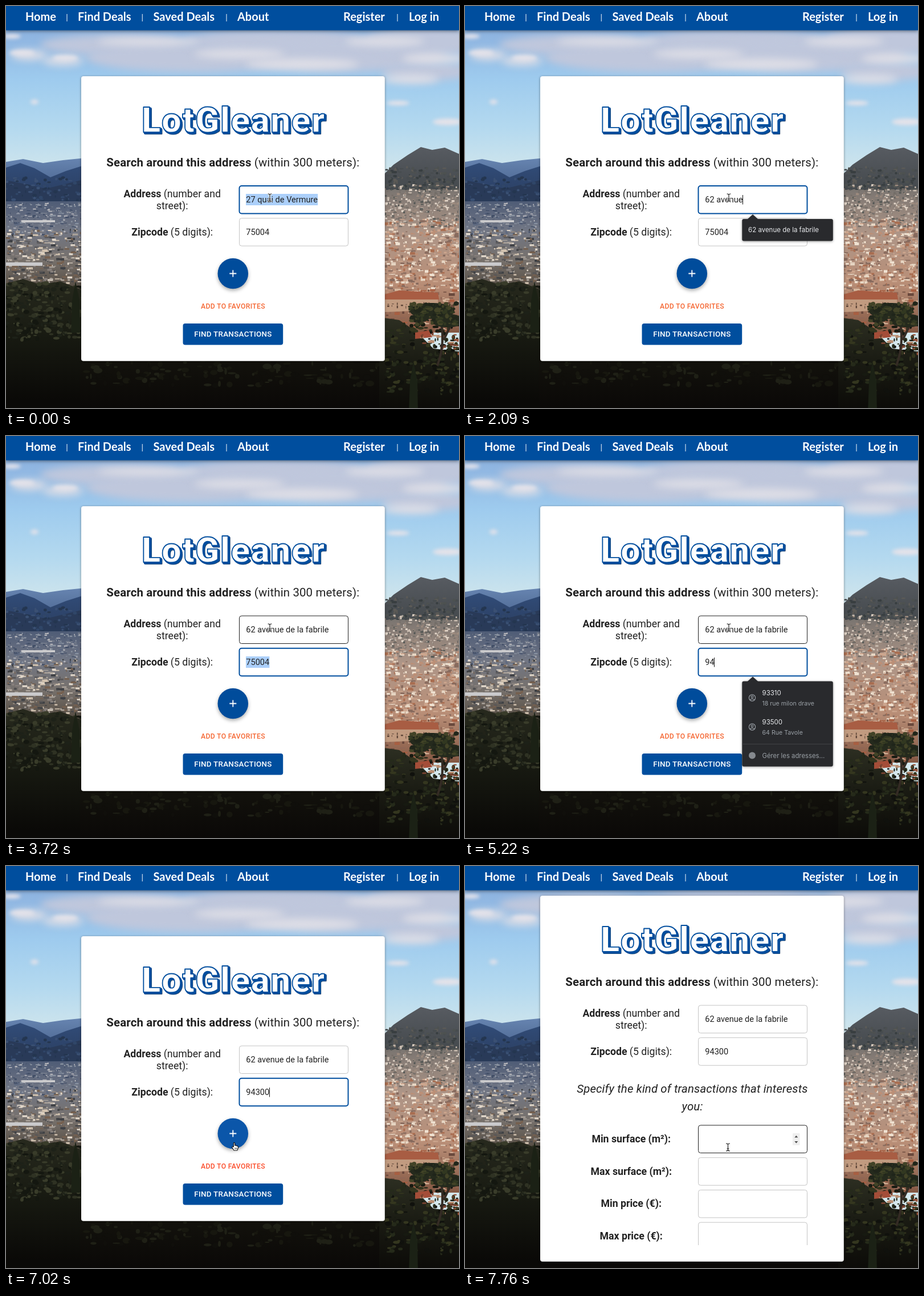
Recreate the animation shown at these times as an HTML page with a canvas. Size 795x704 px, loop 8 s.

```html
<!DOCTYPE html>
<html lang="en">
<head>
<meta charset="utf-8">
<title>LotGleaner</title>
<style>
  html, body { margin: 0; width: 100%; height: 100%; overflow: hidden; background: #0b0908; }
  canvas, svg { position: absolute; left: 0; top: 0; width: 795px; height: 704px; }
  text { font-family: Roboto, sans-serif; fill: #212121; white-space: pre; }
  .mid { text-anchor: middle; }
  .b { font-weight: 700; }
  .nav text { font: 700 20px Lato, sans-serif; fill: #fff; }
  .nav .sep { font-size: 14px; font-weight: 400; }
  .brand { font-size: 62px; font-weight: 900; letter-spacing: 1.5px; stroke-linejoin: round; }
  .head { font-size: 20.4px; letter-spacing: .15px; }
  .label { font-size: 17.7px; }
  .value { font-size: 14.55px; }
  .box { fill: #fff; stroke: #c4c4c4; stroke-width: 1; }
  .box.hover { stroke: #212121; }
  .box.focus { stroke: #004e9e; stroke-width: 2; }
  .sel { fill: #abcffa; }
  .caret { fill: #111; }
  .caps { font-weight: 500; }
  #fav { font-size: 12.2px; letter-spacing: .35px; fill: #f56733; }
  #fav.hover { fill: #fb4d2b; }
  #fab { fill: #004c9b; filter: drop-shadow(0 3px 3px #0005); }
  #fab.hover { fill: #0b56a9; }
  .menu { filter: drop-shadow(0 1px 2px #0006); }
  .menu text { font: 11.5px Inter, sans-serif; fill: #e8eaed; }
  .menu .dim { fill: #9aa0a6; font-size: 10.6px; }
  .menu .foot { fill: #9aa0a6; font-size: 11.3px; }
</style>
</head>
<body>
<canvas id="view" width="795" height="704"></canvas>
<svg viewBox="0 0 795 704">
  <defs>
    <clipPath id="fold"><rect x="132" y="360" width="533" height="304"/></clipPath>
    <g id="ibeam" fill="none" stroke-linecap="round">
      <path id="beam" d="M-3-6.5Q0-6.5 0-4.5Q0-6.5 3-6.5M0-4.5V4.5M-3 6.5Q0 6.5 0 4.5Q0 6.5 3 6.5M-1.5 2.5H1.5" stroke="#fff" stroke-width="2.6"/>
      <use href="#beam" style="stroke:#111"/>
      <path d="M-3-6.5Q0-6.5 0-4.5Q0-6.5 3-6.5M0-4.5V4.5M-3 6.5Q0 6.5 0 4.5Q0 6.5 3 6.5M-1.5 2.5H1.5" stroke="#111" stroke-width="1.1"/>
    </g>
    <path id="arrow" d="M-4-7V6L-1 3.3L1 8L3.2 7L1.2 2.5H5Z" fill="#111" stroke="#fff"/>
    <g id="hand" stroke="#111" stroke-linejoin="round">
      <path d="M-2.6 1V-5.6Q-1.5-7.6-.4-5.6V-1.5Q1-2.6 1.7-1Q3.2-1.9 3.8-.3Q5.4-.8 5.4 1V3.4L3.8 7H-2L-5.4 1.6Q-5-.6-2.6 1Z" fill="#fff" stroke-width="1.1"/>
      <path d="M-.2 2.3V5M1.6 2.3V5M3.3 2.3V5" stroke-width=".7"/>
    </g>
  </defs>

  <rect width="795" height="42.5" fill="#004e9e" style="filter:drop-shadow(0 1px 3px #0008)"/>
  <g class="nav">
    <text x="34" y="26">Home</text><text x="126" y="26">Find Deals</text>
    <text x="258.5" y="26">Saved Deals</text><text x="406" y="26">About</text>
    <text x="592" y="26">Register</text><text x="707" y="26">Log in</text>
    <g class="mid">
      <text class="sep" x="107" y="25">|</text><text class="sep" x="239.3" y="25">|</text>
      <text class="sep" x="387" y="25">|</text><text class="sep" x="687" y="25">|</text>
    </g>
  </g>

  <rect id="card" x="132" width="532.8" rx="4" fill="#fff" style="filter:drop-shadow(0 1px 2px #0006)"/>

  <g id="form">
    <g class="mid">
      <g class="brand">
        <text x="402.5" y="223.5" style="fill:#3b4a63;stroke:#3b4a63" stroke-width="2">LotGleaner</text>
        <text x="401.5" y="222.5" style="fill:#004e9e;stroke:#004e9e" stroke-width="3">LotGleaner</text>
        <text x="399.5" y="220.5" style="fill:#fff;stroke:#004e9e" stroke-width="1.8">LotGleaner</text>
      </g>
      <text class="head" x="398.3" y="281"><tspan class="b">Search around this address</tspan> (within 300 meters):</text>
      <g class="label">
        <text x="291.7" y="334.5"><tspan class="b">Address</tspan> (number and</text>
        <text x="291.7" y="355.5">street):</text>
        <text x="291.7" y="402"><tspan class="b">Zipcode</tspan> (5 digits):</text>
      </g>
    </g>
    <rect id="streetBox" class="box" x="409.5" y="315" width="191" height="48.5" rx="4"/>
    <rect id="streetSel" class="sel" x="421" y="329" height="20"/>
    <text id="street" class="value" x="421.3" y="344"></text>
    <rect id="streetCaret" class="caret" y="331" width="1" height="16.5"/>
    <rect id="zipBox" class="box" x="409.5" y="371.7" width="191" height="48.5" rx="4"/>
    <rect id="zipSel" class="sel" x="421" y="386" height="20"/>
    <text id="zip" class="value" x="421.3" y="401"></text>
    <rect id="zipCaret" class="caret" y="388" width="1" height="16.5"/>
  </g>

  <g id="actions">
    <circle id="fab" cx="398.3" cy="468.5" r="26.8"/>
    <path d="M392.3 468.5h12M398.3 462.5v12" stroke="#fff" stroke-width="1.8"/>
    <text id="fav" class="caps mid" x="398.5" y="529.5">ADD TO FAVORITES</text>
    <rect x="310.5" y="556" width="175.7" height="37.5" rx="4" fill="#004e9e"/>
    <text class="caps mid" x="398.5" y="579" style="font-size:13.4px;letter-spacing:.3px;fill:#fff">FIND TRANSACTIONS</text>
  </g>

  <g id="filters" clip-path="url(#fold)">
    <g class="head mid" font-style="italic">
      <text x="399" y="396.5">Specify the kind of transactions that interests</text>
      <text x="399" y="427.5">you:</text>
    </g>
    <g id="ranges"></g>
    <g id="spinner">
      <rect x="575" y="468" width="12.5" height="21" rx="1" fill="#efefef"/>
      <path d="M578.3 475.5h6l-3-3.5zM578.3 482h6l-3 3.5z" fill="#4a4a4a"/>
    </g>
  </g>

  <g id="menus">
    <g id="manyMenu" class="menu">
      <path d="M495 374L505 365L515 374Z" fill="#292a2d"/>
      <rect x="486.3" y="373" width="159.5" height="113" rx="3" fill="#292a2d"/>
      <text x="497" y="396">62 avenue de la fabrile</text>
      <text x="497" y="433.5">64 Rue Tavole</text>
      <text x="497" y="471">68 chemin de Lorvant</text>
    </g>
    <g id="oneMenu" class="menu">
      <path d="M495 374L505 365L515 374Z" fill="#292a2d"/>
      <rect x="486.3" y="373" width="159.5" height="38.5" rx="3" fill="#292a2d"/>
      <text x="497" y="396">62 avenue de la fabrile</text>
    </g>
    <g id="zipMenu" class="menu">
      <path d="M495 430.5L505 421.5L515 430.5Z" fill="#292a2d"/>
      <rect x="486.3" y="429.5" width="159.5" height="149.3" rx="3" fill="#292a2d"/>
      <path d="M486.3 539.5h159.5" stroke="#414246"/>
      <g id="person" fill="none" stroke="#9aa0a6" stroke-width="1.2">
        <circle cx="504" cy="458.5" r="5.6"/><circle cx="504" cy="456.8" r="1.8"/>
        <path d="M500 462Q504 458.8 508 462"/>
      </g>
      <use href="#person" y="51"/>
      <text x="521.5" y="453.5">93310</text><text class="dim" x="521.5" y="472">18 rue milon drave</text>
      <text x="521.5" y="504.5">93500</text><text class="dim" x="521.5" y="523.3">64 Rue Tavole</text>
      <circle cx="504" cy="559.5" r="6" fill="#85898e"/>
      <text class="foot" x="521.5" y="564">Gérer les adresses…</text>
    </g>
  </g>
  <use id="cursor"/>
</svg>
<script>
const $ = id => document.getElementById(id);

/* Hillside town, painted once */
function paintView() {
  const c = $('view').getContext('2d');
  let seed = 11;
  const rnd = () => (seed = (seed * 16807) % 2147483647) / 2147483647;
  const between = (a, b) => a + (b - a) * rnd();
  const pick = list => list[Math.floor(rnd() * list.length)];
  const fade = (y0, y1, ...colors) => {
    const g = c.createLinearGradient(0, y0, 0, y1);
    colors.forEach((col, i) => g.addColorStop(i / (colors.length - 1), col));
    return g;
  };
  const poly = (fill, ...p) => {
    c.fillStyle = fill;
    c.beginPath();
    for (let i = 0; i < p.length; i += 2) c.lineTo(p[i], p[i + 1]);
    c.fill();
  };
  const oval = (fill, x, y, rx, ry) => {
    c.fillStyle = fill;
    c.beginPath();
    c.ellipse(x, y, rx, ry, 0, 0, 7);
    c.fill();
  };
  const specks = (n, x0, y0, x1, y1, w, h, colors) => {
    for (let i = 0; i < n; i++) {
      c.fillStyle = pick(colors);
      c.fillRect(between(x0, x1), between(y0, y1), between(1, w), between(1, h));
    }
  };
  const leaves = (n, x0, y0, x1, y1, r, colors) => {
    for (let i = 0; i < n; i++) oval(pick(colors), between(x0, x1), between(y0, y1), between(1, r), between(1, r * .7));
  };

  c.fillStyle = fade(42, 300, '#8db2df', '#9ecbee', '#b4d9ef', '#d4e7ec');
  c.fillRect(0, 0, 795, 704);

  c.filter = 'blur(7px)';
  [[190, 68, 130, 18], [330, 90, 190, 26], [470, 62, 160, 20], [600, 85, 170, 30], [740, 62, 110, 24], [740, 115, 80, 16]]
    .forEach(o => oval('#bfc7dc', ...o));
  [[40, 86, 32, 9], [100, 96, 36, 8], [250, 62, 90, 7], [410, 84, 80, 8], [520, 102, 100, 10], [665, 62, 70, 8], [755, 92, 60, 9], [710, 128, 50, 8]]
    .forEach(o => oval('#dedee6', ...o));
  c.filter = 'blur(3px)';
  [[28, 82, 22, 5], [104, 91, 22, 5], [50, 168, 7, 4], [10, 53, 16, 4], [688, 170, 20, 4], [775, 203, 26, 6]]
    .forEach(o => oval('#e4e2e9', ...o));
  c.filter = 'none';

  // left hills and town
  poly(fade(265, 340, '#6785b1', '#415a84'), 0, 273, 30, 268, 65, 275, 100, 270, 140, 266, 140, 370, 0, 370);
  poly(fade(275, 350, '#314c78', '#2a3c5d'), 0, 283, 25, 275, 50, 284, 78, 300, 105, 289, 140, 278, 140, 370, 0, 370);
  poly('#293a58', 0, 305, 35, 312, 70, 320, 140, 303, 140, 370, 0, 360);
  leaves(90, 0, 300, 135, 340, 4, ['#304668', '#243650', '#3a5073']);
  c.fillStyle = fade(338, 500, '#4c5a75', '#717684', '#76706b', '#51483e');
  c.fillRect(0, 342, 140, 160);
  specks(330, 0, 344, 135, 400, 7, 3, ['#5c6880', '#8992a0', '#b5b5ba', '#414e67', '#747c8b']);
  specks(430, 0, 390, 135, 484, 10, 4, ['#aaa29a', '#d2c3b0', '#595758', '#88817d', '#75604f', '#3f4145', '#e0d6c9']);
  c.fillStyle = '#c9c9cb';
  c.fillRect(28, 375, 58, 4);
  c.fillRect(0, 449, 64, 6);

  // right hill and town
  poly(fade(247, 345, '#575b61', '#3f4447'), 655, 303, 680, 278, 705, 261, 728, 247, 748, 252, 770, 248, 795, 259, 795, 350, 655, 350);
  leaves(160, 668, 282, 795, 325, 4, ['#4d5150', '#383e40', '#5d5b57', '#474c4f']);
  c.fillStyle = fade(310, 570, '#73706d', '#ad9587', '#b98f78', '#865944');
  c.fillRect(655, 322, 140, 250);
  specks(430, 660, 312, 795, 385, 6, 4, ['#c6b9ad', '#e2d5c8', '#77706a', '#9d8b7e', '#565956']);
  specks(600, 660, 372, 795, 500, 9, 5, ['#e7d6c3', '#f0e2d1', '#bc8f76', '#a96d50', '#876a5d', '#cda68e']);
  specks(130, 660, 495, 795, 565, 12, 5, ['#a85f42', '#d5b59b', '#69483c', '#8f6656']);
  poly('#a85d43', 665, 505, 690, 498, 758, 502, 760, 514, 665, 514);
  poly('#c19b80', 665, 514, 758, 514, 758, 532, 665, 536);
  for (let x = 668; x < 755; x += 8) specks(2, x, 518, x + 2, 528, 4, 5, ['#5d4437']);

  // foreground trees
  poly(fade(475, 690, '#282a1e', '#171911', '#0a0907'), 0, 486, 30, 478, 60, 488, 95, 482, 140, 500, 140, 704, 0, 704);
  leaves(260, 0, 485, 138, 585, 6, ['#2f3223', '#1d2118', '#393c2a', '#141710']);
  c.fillStyle = fade(610, 704, '#14130d', '#0a0807');
  c.fillRect(130, 600, 540, 104);
  leaves(150, 130, 622, 660, 665, 8, ['#17170f', '#100f0b', '#1f2016']);
  poly(fade(540, 704, '#2e3023', '#1a1b13', '#0c0b08'), 655, 545, 690, 550, 720, 570, 750, 600, 795, 605, 795, 704, 655, 704);
  leaves(230, 666, 555, 795, 680, 6, ['#252a1a', '#34361f', '#171a11', '#10110d']);
  poly('#a44d38', 718, 572, 742, 568, 748, 580, 718, 583);
  specks(30, 726, 570, 795, 608, 10, 5, ['#9a5138', '#b98d70', '#74412f']);
  c.strokeStyle = '#342b24';
  c.lineWidth = 4;
  c.beginPath();
  c.moveTo(757, 630); c.quadraticCurveTo(772, 590, 762, 545);
  c.moveTo(768, 585); c.lineTo(785, 550);
  c.stroke();
  [[748, 534, 39, 14], [775, 551, 28, 12], [725, 547, 17, 7]].forEach(o => oval('#252a1d', ...o));
  leaves(120, 708, 521, 795, 558, 6, ['#323821', '#20251a', '#424327']);
  [[715, 622], [122, 482]].forEach(([x, y]) => poly('#1b2115', x, y, x + 7, y + 35, x + 8, y + 90, x - 8, y + 90, x - 6, y + 35));
}

function buildRanges() {
  $('ranges').innerHTML = ['Min surface (m²):', 'Max surface (m²):', 'Min price (€):', 'Max price (€):'].map((label, i) => {
    const y = 454 + i * 56.7;
    return `<text class="label b mid" x="291.7" y="${y + 30}">${label}</text>
      <rect class="box" x="409.5" y="${y}" width="191" height="48.5" rx="4"/>`;
  }).join('');
}

const address = '62 avenue de la fabrile';
const typed = (n, more) => ({ street: address.slice(0, n), ...more });
const point = (kind, x, y, more) => ({ cursor: [kind, x, y], ...more });

// Each step changes only what it names.
const steps = [
  [0, point('ibeam', 463, 335.5, { street: '27 quai de Vermure', zip: '75004', streetBox: 'focus', zipBox: '',
    select: 'street', caret: '', menu: '', favHover: false, fabHover: false, expanded: false, rangeHover: false })],
  [900, typed(1, { select: '', caret: 'street', menu: 'manyMenu' })],
  [1050, typed(2, { menu: 'oneMenu' })],
  [1200, typed(3)], [1500, typed(4)], [1800, typed(5)], [1950, typed(7)], [2090, typed(9)],
  [2240, typed(10)], [2390, typed(11)], [2540, typed(13)], [2680, typed(15)], [2830, typed(18)],
  [2980, typed(19)], [3130, typed(21)], [3270, typed(22)], [3420, typed(23, { menu: '' })],
  [3720, { streetBox: 'hover', zipBox: 'focus', select: 'zip', caret: '' }],
  [5220, { zip: '94', select: '', caret: 'zip', menu: 'zipMenu' }],
  [5370, { zip: '943', menu: '' }], [5520, { zip: '9430' }], [5670, { zip: '94300' }],
  [6120, point('ibeam', 457, 353, { caret: '' })],
  [6270, point('ibeam', 438.5, 405, { streetBox: '' })],
  [6420, point('arrow', 424, 462)],
  [6570, point('hand', 412, 512, { favHover: true })],
  [6720, point('hand', 406, 528, { caret: 'zip' })],
  [6870, point('hand', 403, 512)],
  [7020, point('hand', 402, 491, { fabHover: true })],
  [7170, point('arrow', 402, 491, { expanded: true, zipBox: '', caret: '' })],
  [7470, point('ibeam', 420, 491, { rangeHover: true })],
  [7620, point('ibeam', 446, 492)],
  [7760, point('ibeam', 461.5, 492.5)]
];

const show = (id, on) => $(id).style.display = on ? '' : 'none';
const box = (el, state) => el.setAttribute('class', 'box ' + state);

function render(s) {
  for (const id of ['street', 'zip']) {
    $(id).textContent = s[id];
    const width = $(id).getComputedTextLength();
    box($(id + 'Box'), s[id + 'Box']);
    show(id + 'Sel', s.select === id);
    $(id + 'Sel').setAttribute('width', width + .5);
    show(id + 'Caret', s.caret === id);
    $(id + 'Caret').setAttribute('x', Math.round(421 + width));
  }
  for (const id of ['manyMenu', 'oneMenu', 'zipMenu']) show(id, s.menu === id);
  $('fav').classList.toggle('hover', s.favHover);
  $('fab').classList.toggle('hover', s.fabHover);
  $('card').setAttribute('y', s.expanded ? 52 : 123);
  $('card').setAttribute('height', s.expanded ? 640.7 : 498.8);
  $('form').setAttribute('transform', `translate(0 ${s.expanded ? -71 : 0})`);
  show('actions', !s.expanded);
  show('filters', s.expanded);
  show('spinner', s.rangeHover);
  box($('ranges').querySelector('rect'), s.rangeHover ? 'hover' : '');
  const [kind, x, y] = s.cursor;
  $('cursor').setAttribute('href', '#' + kind);
  $('cursor').setAttribute('transform', `translate(${x} ${y})`);
}

let shown = 0;
function tick() {
  const time = performance.now() % 8000;
  const past = steps.filter(([at]) => at <= time);
  if (past.length !== shown) {
    shown = past.length;
    render(Object.assign({}, ...past.map(step => step[1])));
  }
  requestAnimationFrame(tick);
}

paintView();
buildRanges();
tick();
</script>
</body>
</html>
```
